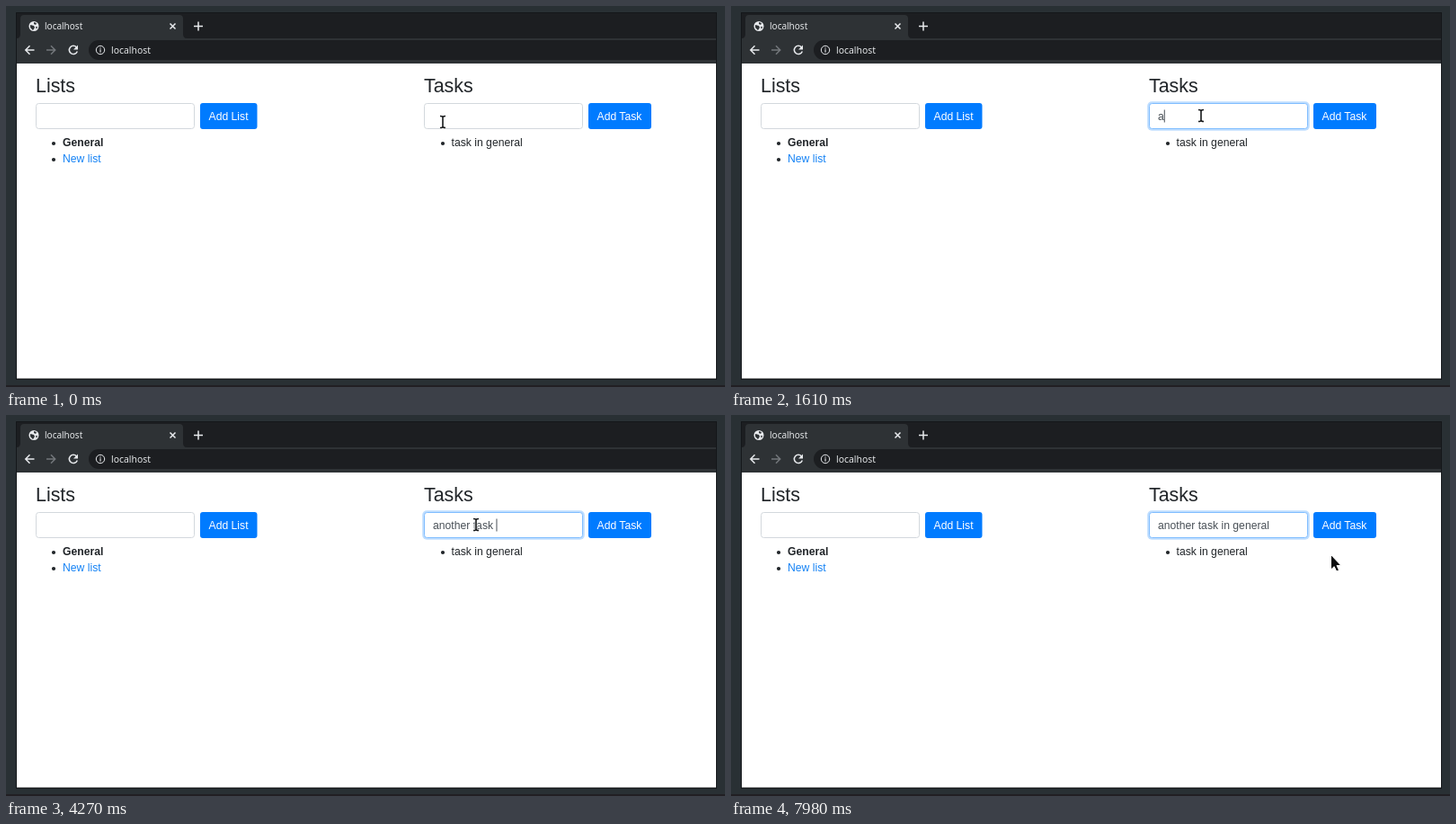
These frames come from a looping animation (800x424 px, 8000 ms). An HTML page:

```html
<!DOCTYPE html>
<html lang="en">
<head>
<meta charset="utf-8">
<title>Task list</title>
<style>
  html, body { margin: 0; height: 100%; overflow: hidden; background: #293034; }
  svg { display: block; }
  text { font: 12.2px "Liberation Sans", Arial, sans-serif; fill: #212529; white-space: pre; }
  .chrome text { font: 500 10px "Noto Sans", sans-serif; fill: #e4e6e8; }
  .chrome text.url { font-size: 10.4px; }
  text.title { font-size: 21.4px; }
  .field { fill: #fff; stroke: #d3d8dd; }
  .focus .field { stroke: #80bdff; }
  .halo { fill: #bfdeff; visibility: hidden; }
  .focus .halo { visibility: visible; }
  .button { fill: #007bff; }
  text.label { fill: #fff; }
  text.typed { fill: #495057; }
  .icon { fill: none; stroke: #e8eaed; stroke-width: 1.5; }
</style>
</head>
<body>
<svg width="800" height="424" viewBox="0 0 800 424">
  <rect width="800" height="424" fill="#293034"/>
  <rect y="422" width="800" height="2" fill="#211f23"/>
  <rect x="11.5" y="7.5" width="779" height="408" fill="#1c1e21" stroke="#14171a"/>

  <g class="chrome">
    <path d="M12 36Q16 36 16 31V14Q16 10 20 10H193Q197 10 197 14V31Q197 36 201 36H790V64H12Z" fill="#2e3235"/>
    <path d="M790 38H103A11 11 0 0 0 103 60H790Z" fill="#1c1e21"/>
    <circle cx="31" cy="22.5" r="5.5" fill="#e8eaed"/>
    <path d="M27 21l4 1 1 2-2 3-3-3zM31 18l3 1-1 2-2-1zM33 23l2 0-1 3z" fill="#2e3235"/>
    <text x="43" y="26">localhost</text>
    <path class="icon" d="M182.5 19.5l6 6m0-6l-6 6M209 22.500h10m-5-5v10"/>
    <path class="icon" d="M31.500 49H21.500m5-4.700L21.800 49l4.700 4.700"/>
    <path class="icon" d="M45 49h10m-5-4.700L54.700 49 50 53.700" style="stroke:#73777b"/>
    <path class="icon" d="M78.500 46A4.600 4.600 0 1 0 79.300 50.500"/>
    <path d="M80 43.500v5h-5z" fill="#e8eaed"/>
    <circle class="icon" cx="105" cy="49" r="4.700" style="stroke-width:1"/>
    <path class="icon" d="M105 48.300v3.400m0-5.400v1.100" style="stroke-width:1.100"/>
    <text class="url" x="117" y="52.700">localhost</text>
  </g>

  <rect x="12" y="64" width="778" height="350.500" fill="#fff"/>

  <g>
    <text class="title" x="33" y="96">Lists</text>
    <rect class="field" x="33.500" y="108.500" width="176" height="28" rx="3"/>
    <rect class="button" x="216" y="108" width="63.500" height="29" rx="3"/>
    <text class="label" x="225.500" y="126.500">Add List</text>
    <circle cx="53" cy="153" r="2.100" fill="#212529"/>
    <text x="63" y="156" style="font-weight:bold">General</text>
    <circle cx="53" cy="171" r="2.100" fill="#212529"/>
    <text x="63" y="174" style="fill:#1683f5">New list</text>
  </g>

  <g id="tasks">
    <text class="title" x="465" y="96">Tasks</text>
    <rect class="halo" x="463.200" y="106.200" width="180.600" height="32.600" rx="5"/>
    <rect class="field" x="465.500" y="108.500" width="176" height="28" rx="3"/>
    <rect class="button" x="648" y="108" width="70" height="29" rx="3"/>
    <text class="label" x="657.500" y="126.500">Add Task</text>
    <circle cx="486" cy="153" r="2.100" fill="#212529"/>
    <text x="495.500" y="156">task in general</text>
    <text class="typed" id="typed" x="475" y="126.500"></text>
    <rect id="caret" y="115.500" width="1" height="14" fill="#495057"/>
  </g>

  <g id="beam" fill="none">
    <path d="M-3-6.500Q0-6.500 0-5Q0-6.500 3-6.500M0-5V5M-3 6.500Q0 6.500 0 5Q0 6.500 3 6.500" stroke="#fff" stroke-width="3"/>
    <path d="M-3-6.500Q0-6.500 0-5Q0-6.500 3-6.500M0-5V5M-3 6.500Q0 6.500 0 5Q0 6.500 3 6.500" stroke="#16181a" stroke-width="1.600"/>
  </g>
  <path id="arrow" d="M0 0V16.500L3.700 13.200L6.200 18.500L9 17.200L6.500 12H11.300Z" fill="#0c0d0e" stroke="#fff" stroke-width="1"/>
</svg>

<script>
const LOOP = 8000, FRAME = 70, FOCUS = 350;
const PHRASE = "another task in general";
// [time, letters typed by then]
const PACE = [[1500, 1], [3200, 9], [5150, 17], [5850, 20], [6250, 21], [6600, 22], [7000, 23]];
// [start, end, from, to]
const MOVES = [[0, 350, [486, 129], [523, 122]], [7700, 7980, [523, 122], [667.5, 155.5]]];

const [tasks, typed, caret, beam, arrow] =
  ["tasks", "typed", "caret", "beam", "arrow"].map(id => document.getElementById(id));

const keyTimes = [PACE[0][0]];
for (let i = 1; i < PACE.length; i++) {
  const [t0, n0] = PACE[i - 1], [t1, n1] = PACE[i];
  for (let n = n0 + 1; n <= n1; n++) keyTimes.push(t0 + (t1 - t0) * (n - n0) / (n1 - n0));
}

const show = (node, on) => node.setAttribute("visibility", on ? "visible" : "hidden");
const ease = p => p * p * (3 - 2 * p);

function pointerAt(t) {
  const [start, end, from, to] = MOVES[t < MOVES[1][0] ? 0 : 1];
  const p = ease(Math.min(1, (t - start) / (end - start)));
  return from.map((v, i) => v + (to[i] - v) * p);
}

function draw(t) {
  const focused = t >= FOCUS;
  tasks.classList.toggle("focus", focused);

  const count = keyTimes.filter(k => k <= t).length;
  typed.textContent = PHRASE.slice(0, count);
  const lastAction = count ? keyTimes[count - 1] : FOCUS;
  show(caret, focused && (t - lastAction) % 1000 < 500);
  caret.setAttribute("x", 475 + (count ? typed.getComputedTextLength() : 0));

  const [x, y] = pointerAt(t);
  const overField = x < 642 && y < 137;
  for (const node of [beam, arrow]) node.setAttribute("transform", `translate(${x} ${y})`);
  show(beam, overField);
  show(arrow, !overField);
}

function tick() {
  const t = performance.now() % LOOP;
  draw(Math.floor(t / FRAME) * FRAME);
  requestAnimationFrame(tick);
}
tick();
</script>
</body>
</html>
```
